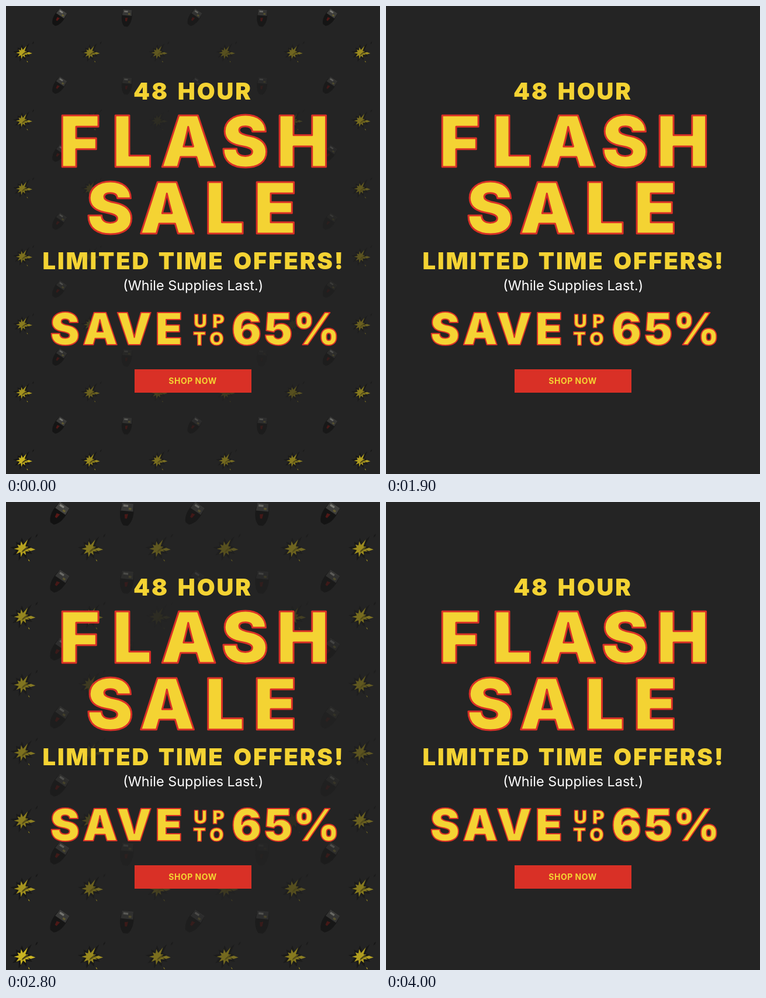
Animation, 640 px wide and 800 px high, one loop 4200 ms. Source, as an HTML page with a canvas:

```html
<!DOCTYPE html>
<html lang="en">
<head>
<meta charset="utf-8">
<title>48 Hour Flash Sale</title>
<style>
  html, body { margin: 0; width: 100%; height: 100%; overflow: hidden; background: #242424; }
  canvas { display: block; }
</style>
</head>
<body>
<canvas id="stage" width="640" height="800"></canvas>
<script>
const ctx = document.getElementById('stage').getContext('2d');
const BG = '#242424', YELLOW = '#f4d333', RED = '#d93026', DARK = '#151515', BURST = '#dcc422';
const STEP = 700, SHOWN = 500, SCENES = 6;
const SPIKES = [1, .95, 1.1, 1.05, 1.1, .85, 1, 1.4, .8];
const BIG_DEBRIS = [[1.4, .9, 1.95, 1.3]];
const SMALL_DEBRIS = [[.5, .05, 1.7, .1], [.75, 1.35, .95, 1.65]];

function polygon(points, color) {
  ctx.beginPath();
  points.forEach(([x, y]) => ctx.lineTo(x, y));
  ctx.closePath();
  ctx.fillStyle = color;
  ctx.fill();
}

function spiky(radius, inner, turn) {
  const points = [], half = Math.PI / SPIKES.length;
  SPIKES.forEach((spike, i) => {
    const a = turn + i * 2 * half;
    points.push([Math.cos(a) * spike * radius, Math.sin(a) * spike * radius]);
    points.push([Math.cos(a + half) * inner * radius, Math.sin(a + half) * inner * radius]);
  });
  return points;
}

function sliver([x1, y1, x2, y2], color) {
  const nx = (y1 - y2) * .17, ny = (x2 - x1) * .17;
  polygon([[x1, y1], [(x1 + x2) / 2 + nx, (y1 + y2) / 2 + ny],
    [x2, y2], [(x1 + x2) / 2 - nx, (y1 + y2) / 2 - ny]], color);
}

// The pattern fades out towards the middle of the stage.
function fade(x, y) {
  const distance = Math.hypot((x - 345) * 1.25, y - 400);
  return Math.max(0, Math.min(1, (distance - 210) / 370));
}

function at(x, y, size, draw) {
  ctx.save();
  ctx.globalAlpha = fade(x, y);
  ctx.translate(x, y);
  ctx.scale(size, size);
  draw();
  ctx.restore();
}

function star(x, y, radius, debris) {
  at(x, y, radius, () => {
    polygon(spiky(1.45, .55, .47), DARK);
    sliver([1.7, -1.45, 2, -1.95], DARK);
    polygon(spiky(1, .5, .35), BURST);
    debris.forEach(d => sliver(d, BURST));
    for (let i = 0; i < 4; i++) {
      const k = i * .2;
      sliver([-.1 + k, .5 - k * .5, .25 + k * .6, .05 - k * .7], '#3a3518');
    }
  });
}

function bottle(x, y, size, turn) {
  at(x, y, size, () => {
    ctx.rotate(turn);
    ctx.fillStyle = '#0e0e0e';
    ctx.beginPath();
    ctx.moveTo(-8, -13);
    ctx.lineTo(8, -13);
    ctx.bezierCurveTo(12, 0, 9, 13, 3, 18);
    ctx.lineTo(-3, 18);
    ctx.bezierCurveTo(-9, 13, -12, 0, -8, -13);
    ctx.fill();
    polygon([[-8, -14], [8, -14], [9, -3], [-9, -3]], '#50504e');
    polygon([[-6, -12], [1, -12], [1, -9], [-6, -9]], '#96958e');
    polygon([[2, -8], [6, -8], [6, -5], [2, -5]], '#776d2c');
    polygon([[-3, 2], [2, 1], [1, 8], [-2, 8]], '#6d1a17');
  });
}

function productPattern(size) {
  for (let row = 0; row < 7; row++) {
    for (let col = 0; col < 6; col++) {
      const x = 28 + col * 115.7, y = 80 + row * 116.2;
      star(x, y, 10 * size, SMALL_DEBRIS);
      if (col < 5) bottle(x + 63, y - 61, size * .9, col % 2 ? .1 : .6);
    }
  }
}

function burstPattern() {
  for (let y = -45; y < 900; y += 150) {
    for (let x = 25; x < 700; x += 300) {
      star(x, y, 27, BIG_DEBRIS);
      star(x + 77, y + 75, 24, BIG_DEBRIS);
      star(x + 153, y - 4, 16, BIG_DEBRIS);
      star(x + 228, y + 75, 18, BIG_DEBRIS);
    }
  }
}

// Centres the visible ink of a piece of text on cx.
function put(text, cx, baseline, size, { weight = 900, track = 0, color = YELLOW, outline = 0 } = {}) {
  ctx.font = `${weight} ${size}px Inter, sans-serif`;
  ctx.letterSpacing = track + 'px';
  const m = ctx.measureText(text);
  const x = cx - (m.actualBoundingBoxRight - m.actualBoundingBoxLeft) / 2;
  ctx.fillStyle = color;
  ctx.fillText(text, x, baseline);
  if (outline) {
    ctx.lineWidth = outline;
    ctx.lineJoin = 'round';
    ctx.strokeStyle = RED;
    ctx.strokeText(text, x, baseline);
  }
}

function lettering(word, centres, baseline, size, outline) {
  [...word].forEach((c, i) => put(c, centres[i], baseline, size, { outline }));
}

function message() {
  const heading = { track: 2.8 };
  put('48', 247, 160, 40, heading);
  put('HOUR', 357, 160, 40, heading);
  lettering('FLASH', [127, 217, 312.5, 409, 508], 275, 121, 3);
  lettering('SALE', [178, 276, 375.5, 461], 389, 121, 3);
  put('LIMITED', 153.5, 450, 40, heading);
  put('TIME', 315.5, 450, 40, heading);
  put('OFFERS!', 482, 450, 40, heading);
  put('(While Supplies Last.)', 320.5, 486, 23.4, { weight: 400, color: '#fff' });
  lettering('SAVE', [101, 161, 219, 279], 579, 76, 2);
  lettering('UP', [332.5, 364], 550, 32, 1.5);
  lettering('TO', [331, 360.5], 580, 32, 1.5);
  lettering('65%', [411.5, 466, 531], 579, 76, 2);
  ctx.fillStyle = RED;
  ctx.fillRect(220, 621, 200, 40);
  put('SHOP NOW', 319.5, 646, 14, { weight: 700, track: .5 });
}

function render(time) {
  const t = time % (STEP * SCENES), scene = Math.floor(t / STEP);
  ctx.fillStyle = BG;
  ctx.fillRect(0, 0, 640, 800);
  if (t % STEP < SHOWN) {
    if (scene % 2) burstPattern();
    else productPattern(1 + scene * .08);
  }
  message();
}

const start = performance.now();
function tick() {
  render(performance.now() - start);
  requestAnimationFrame(tick);
}
tick();
</script>
</body>
</html>
```
